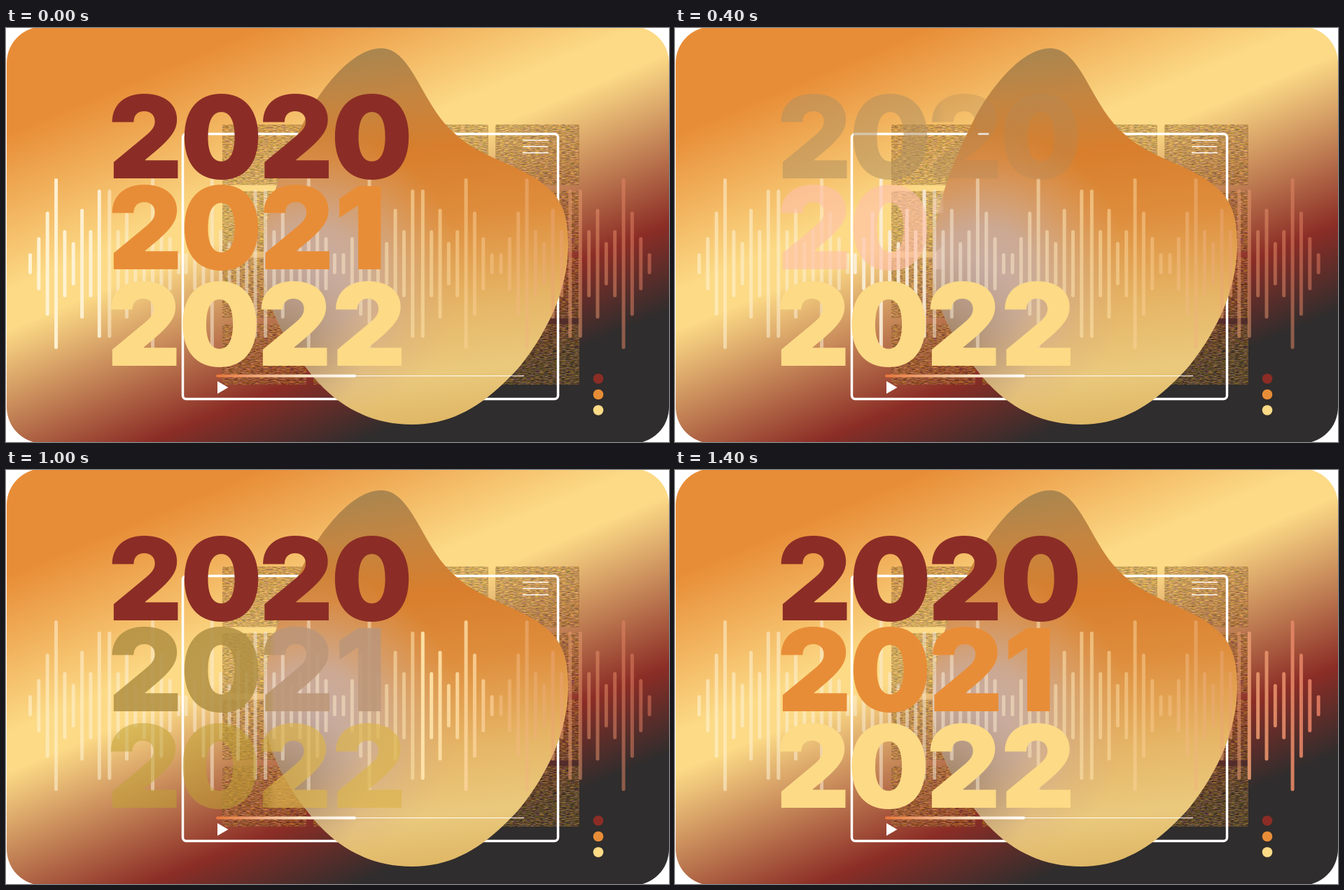
Animation, 947 px wide and 592 px high, one loop 1.6 s. Source, as an HTML page:

```html
<!DOCTYPE html>
<html lang="en">
<head>
<meta charset="utf-8">
<title>2020 2021 2022</title>
<style>
  html, body { margin: 0; width: 100%; height: 100%; overflow: hidden; background: #fff; }
  svg { display: block; width: 947px; height: 592px; }
  text { font: 900 164px Inter, "Open Sans", sans-serif; text-anchor: middle; }
</style>
</head>
<body>
<svg viewBox="0 0 947 592">
  <defs>
    <linearGradient id="sky" gradientUnits="userSpaceOnUse" x1="0" y1="0" x2="286" y2="682">
      <stop offset=".19" stop-color="#e88d37"/>
      <stop offset=".47" stop-color="#fcda86"/>
      <stop offset=".54" stop-color="#fcda86"/>
      <stop offset=".845" stop-color="#8b2d26"/>
      <stop offset="1" stop-color="#2f2d2d"/>
    </linearGradient>
    <linearGradient id="body" gradientUnits="userSpaceOnUse" x1="540" y1="29" x2="600" y2="567">
      <stop offset="0" stop-color="#aa864f"/>
      <stop offset=".13" stop-color="#c48541"/>
      <stop offset=".28" stop-color="#d87e2c"/>
      <stop offset=".46" stop-color="#de8d3c"/>
      <stop offset=".7" stop-color="#e6b667"/>
      <stop offset=".87" stop-color="#eac97d"/>
      <stop offset="1" stop-color="#dfb766"/>
    </linearGradient>
    <radialGradient id="mauve" gradientUnits="userSpaceOnUse" cx="440" cy="355" r="210">
      <stop offset="0" stop-color="#c6aca5"/>
      <stop offset=".35" stop-color="#c9ada0" stop-opacity=".85"/>
      <stop offset="1" stop-color="#d9ad80" stop-opacity="0"/>
    </radialGradient>
    <radialGradient id="shade" gradientUnits="userSpaceOnUse" cx="385" cy="450" r="130">
      <stop offset="0" stop-color="#8f7358" stop-opacity=".8"/>
      <stop offset="1" stop-color="#a98c70" stop-opacity="0"/>
    </radialGradient>
    <linearGradient id="glow" gradientUnits="userSpaceOnUse" x1="30" y1="0" x2="920" y2="0">
      <stop offset="0" stop-color="#fff6d8"/>
      <stop offset=".4" stop-color="#f8ead8"/>
      <stop offset=".64" stop-color="#ffe6ac"/>
      <stop offset=".75" stop-color="#f6c488"/>
      <stop offset=".86" stop-color="#e8a070"/>
      <stop offset="1" stop-color="#e07a60"/>
    </linearGradient>
    <linearGradient id="played" gradientUnits="userSpaceOnUse" x1="300" y1="0" x2="500" y2="0">
      <stop offset="0" stop-color="#e8753a"/>
      <stop offset=".6" stop-color="#fbe3c4"/>
      <stop offset="1" stop-color="#fff"/>
    </linearGradient>
    <filter id="grain" x="0" y="0" width="1" height="1" color-interpolation-filters="sRGB">
      <feTurbulence type="fractalNoise" baseFrequency=".16 .9" numOctaves="2" seed="4"/>
      <feColorMatrix values="1.5 .3 0 0 -.3  1 .7 0 0 -.43  .6 0 .9 0 -.56  0 0 0 0 .45"/>
      <feComposite in2="SourceGraphic" operator="in"/>
    </filter>
    <clipPath id="card"><rect x="1" y="-2" width="946" height="596" rx="52"/></clipPath>
    <path id="blob" d="M536 29C495 29 452 85 430 125C400 185 368 255 368 335C368 395 400 450 432 490C470 540 520 567 580 567C640 567 685 538 733 485C772 437 803 375 803 310C803 270 795 245 770 225C735 195 680 188 640 150C594 110 580 29 536 29Z"/>
  </defs>

  <g clip-path="url(#card)">
    <rect width="947" height="592" fill="url(#sky)"/>
    <g id="tiles" filter="url(#grain)"></g>
    <rect x="252.5" y="151.5" width="536" height="379" rx="5" fill="none" stroke="#fff" stroke-width="3.5"/>
    <use href="#blob" fill="url(#body)"/>
    <use href="#blob" fill="url(#mauve)"/>
    <use href="#blob" fill="url(#shade)"/>
    <path d="M434 151.5H447" stroke="#fff" stroke-width="3" stroke-linecap="round"/>
    <path d="M738 160.5H775M738 169.5H774M738 178.5H775" stroke="#fff" stroke-width="1.5"/>
    <g id="bars" fill="none" stroke="url(#glow)" stroke-width="5" stroke-linecap="round"></g>
    <path d="M500 497.5H740" stroke="#fff" stroke-width="1.2"/>
    <rect x="300" y="495.5" width="200" height="4" rx="2" fill="url(#played)"/>
    <path d="M302 505L317.5 514L302 523Z" fill="#fff"/>
    <circle cx="846" cy="501.5" r="7.3" fill="#8b2d26"/>
    <circle cx="846" cy="524" r="7.3" fill="#e88d37"/>
    <circle cx="846" cy="546.5" r="7.3" fill="#fcda86"/>
    <g id="years"></g>
  </g>
</svg>
<script>
  const STEP = 200, STEPS = 8;
  const $ = id => document.getElementById(id);

  function add(parent, tag, attrs, text = '') {
    const el = document.createElementNS('http://www.w3.org/2000/svg', tag);
    for (const key in attrs) el.setAttribute(key, attrs[key]);
    el.textContent = text;
    return parent.appendChild(el);
  }

  for (let i = 0; i < 16; i++) {
    add($('tiles'), 'rect', {
      x: 309 + i % 4 * 130, y: 138 + (i >> 2) * 95.2, width: 120, height: 86.5, rx: 2
    });
  }

  // Eight groups of nine bars; every second group is mirrored.
  const reach = [15, 38, 74.5, 122, 48, 31, 78.5, 48, 106];
  const starts = [34.5, 257.3, 482, 707];
  const groups = Array.from({ length: STEPS }, (_, g) => {
    const left = starts[g >> 1] + g % 2 * 113.3;
    const d = reach.map((_, i) => {
      const r = reach[g % 2 ? 8 - i : i] - 2.5;
      return `M${left + i * 12.35} ${337 - r}V${337 + r}`;
    }).join('');
    return add($('bars'), 'path', { d });
  });

  // Each state is a left, middle and right tint; a missing one repeats the last.
  const red = '#8b2d26', orange = '#e88d37', cream = '#fcda86', none = '#fff0';
  const years = [
    { text: '2020', x: '199 307.5 414.5 522.5', y: 214.5, states: [
      [red], ['#b0906099'], ['#b0906088', '#b0885850'], ['#ff989cc8', '#ff968cc0'],
      ['#6e4000f8'], [red], [red], [red]] },
    { text: '2021', x: '199 307.5 415.5 506', y: 345, states: [
      [orange], [orange], ['#ffc0a8a0', none], ['#ffd05060', '#ff7838b0', '#ff9a4048'],
      ['#ffc49a99', '#f5a06090'], ['#b08f42d8', '#bc9678e6'], [orange], [orange]] },
    { text: '2022', x: '197 305 412 518.5', y: 482.5, states: [
      [cream], [cream], [cream], ['#a4943878', '#b0a07028'],
      [none, '#e8a07090'], ['#c0a23488', '#dcb44cb0'], ['#d2b468e6'], [cream]] }
  ];
  // The first and last states of the top row both rest at full colour.
  years[0].states.splice(1, 1);
  years[0].states.splice(1, 0, ['#b0906099']);

  years.forEach((year, i) => {
    const tint = add($('years'), 'linearGradient', {
      id: 'tint' + i, gradientUnits: 'userSpaceOnUse', x1: 365, y1: 0, x2: 535, y2: 0
    });
    year.stops = [0, .12, 1].map(offset => add(tint, 'stop', { offset }));
    add($('years'), 'text', { x: year.x, y: year.y, fill: `url(#tint${i})` }, year.text);
  });

  let shown = -1;
  function draw(now) {
    const step = Math.floor(now / STEP) % STEPS;
    if (step !== shown) {
      shown = step;
      groups.forEach((bar, g) => bar.setAttribute('opacity', g === step ? .92 : .53));
      for (const { stops, states } of years) {
        const [left, middle = left, right = middle] = states[step];
        [left, middle, right].forEach((c, i) => stops[i].setAttribute('stop-color', c));
      }
    }
    requestAnimationFrame(draw);
  }
  draw(0);
</script>
</body>
</html>
```
